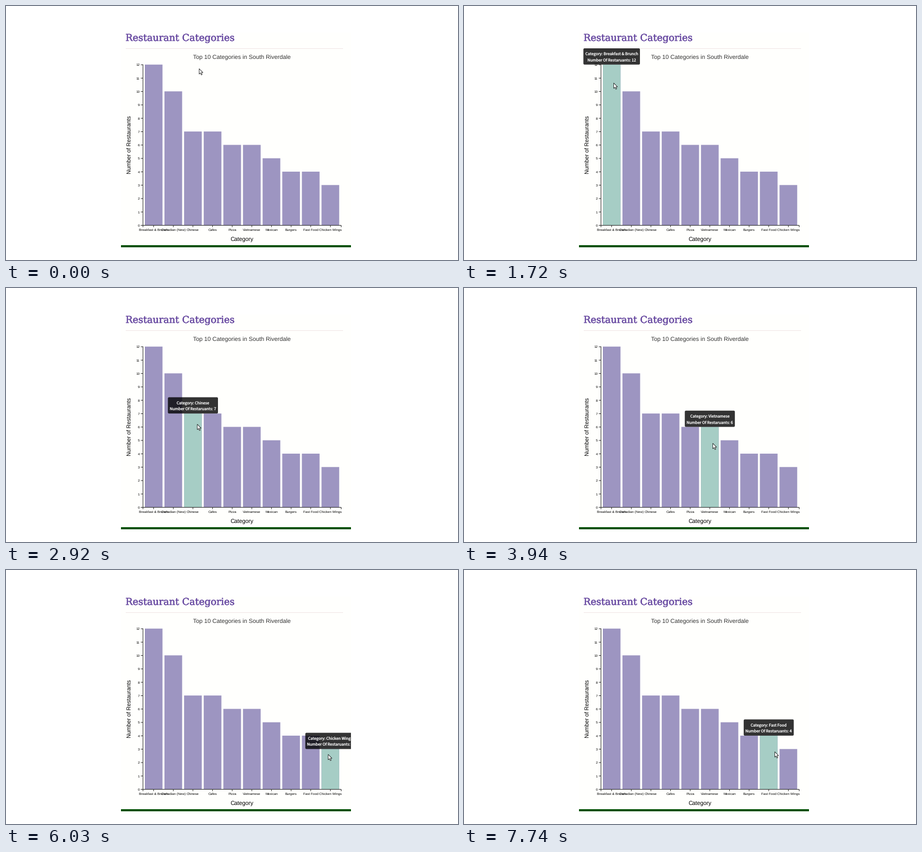
A matplotlib script that plays this animation: 853x480 px, repeating every 7870 ms.

```python
import numpy as np
import matplotlib.pyplot as plt
from matplotlib.animation import FuncAnimation
from matplotlib.patches import FancyBboxPatch, Polygon, Rectangle
from matplotlib.patheffects import withStroke

W, H, DPI = 853, 480, 64
LOOP, TICK = 7870, 10
PX = 72 / DPI  # points per pixel

PURPLE, BAR, HOVER = "#6a4ca3", "#9d95c1", "#a6cdc5"
SANS, SERIF, TIP = "Liberation Sans", "DejaVu Serif", "Noto Sans CJK JP"

DATA = [("Breakfast & Brunch", 12), ("Canadian (New)", 10), ("Chinese", 7),
        ("Cafes", 7), ("Pizza", 6), ("Vietnamese", 6), ("Mexican", 5),
        ("Burgers", 4), ("Fast Food", 4), ("Chicken Wings", 3)]
X0, PITCH, BAR_W = 262, 37.05, 33.35
BASE, UNIT = 414.2, 25.29

HOLDS = [130 if c == "L" else 60 for c in
         "L" "LsLLsLLs" "sLsLsLsLs" "LsLsLsLsL" "sLsLsLsLL" "sLsLsLsLs"
         "LsLsLsLsL" "sLsLsLsLs" "LsLLsLLs" "LsLsLsLss" "L"]
STARTS = np.concatenate([[0], np.cumsum(HOLDS)[:-1]])

# Pointer path: time, x, y
PATH = np.array([(0, 364, 118), (1720, 282, 145), (2920, 360.5, 257),
                 (3940, 469, 293), (5080, 552.5, 327), (6030, 607.5, 348),
                 (7740, 586, 343)])
ARROW = np.array([(0, 0), (0, 10.2), (2.4, 8), (4, 11.8), (5.7, 11),
                  (4.1, 7.4), (7.2, 7.4)])

plt.rcParams["text.hinting"] = "none"
fig = plt.figure(figsize=(W / DPI, H / DPI), dpi=DPI, facecolor="white")


def stage():
    ax = fig.add_axes([0, 0, 1, 1])
    ax.set(xlim=(0, W), ylim=(H, 0))
    ax.axis("off")
    return ax


def label(ax, x, y, s, px, font=SANS, color="black", ha="center", **kw):
    return ax.text(x, y, s, fontsize=px * PX, family=font, color=color,
                   ha=ha, va="baseline", **kw)


def line(ax, xs, ys, color="#222222", px=1):
    # Snapping would push half-pixel centres onto the next pixel
    ax.plot(xs, ys, color=color, lw=px * PX, solid_capstyle="butt",
            solid_joinstyle="miter", snap=False)


def box(ax, x, y, w, h, color, **kw):
    return ax.add_patch(Rectangle((x, y), w, h, fc=color, ec="none",
                                  snap=False, **kw))


def bar_rect(i):
    h = DATA[i][1] * UNIT
    return X0 + i * PITCH, BASE - h, BAR_W, h


def bar_mid(i):
    return X0 + i * PITCH + BAR_W / 2


def draw_page(ax):
    box(ax, 217, 50, 434, 402, "#fffffd")
    box(ax, 217, 452, 434, 4, "#005000")
    label(ax, 225.5, 66, "Restaurant Categories", 18, SERIF, PURPLE, ha="left",
          path_effects=[withStroke(linewidth=0.5 * PX, foreground=PURPLE)])
    line(ax, (226, 636), (80.5, 80.5), "#efe4e4")
    label(ax, 445.3, 101, "Top 10 Categories in South Riverdale", 11.1,
          color="#333333")
    label(ax, 445.3, 443.5, "Category", 10.8)
    label(ax, 237, 262, "Number of Restaurants", 10.6, rotation=90,
          rotation_mode="anchor")

    for i, (name, _) in enumerate(DATA):
        box(ax, *bar_rect(i), BAR)
        mid = bar_mid(i)
        line(ax, (mid, mid), (414, 418))
        label(ax, mid, 424.5, name, 6.44)
    line(ax, (258.5, 258.5, 632.5, 632.5), (418, 414.5, 414.5, 418))

    line(ax, (258.5, 258.5), (110.5, 415))
    for n in range(13):
        y = 414.5 - n * UNIT
        line(ax, (254.5, 258.5), (y, y))
        label(ax, 252.5, y + 2.3, str(n), 6.44, ha="right")


# The page never changes, so it is rendered once and reused as a backdrop
page = stage()
draw_page(page)
fig.canvas.draw()
backdrop = np.array(fig.canvas.buffer_rgba())
page.remove()
fig.figimage(backdrop, origin="upper", zorder=-1)

ax = stage()
hover = box(ax, 0, 0, BAR_W, 1, HOVER, zorder=2)
tip = ax.add_patch(FancyBboxPatch((0, 0), 1, 1, fc=(0, 0, 0, 0.8), ec="none",
                                  boxstyle="round,pad=0,rounding_size=2.2",
                                  zorder=3))
lines = [label(ax, 0, 0, "", 7.3, TIP, "white", zorder=4) for _ in range(2)]
box(ax, 651, 0, W - 651, H, "white", zorder=5)
pointer = ax.add_patch(Polygon(ARROW, fc="white", ec="black", lw=0.75 * PX,
                               joinstyle="miter", zorder=6))
popup = [hover, tip, *lines]


def bar_at(x, y):
    for i in range(len(DATA)):
        left, top, w, _ = bar_rect(i)
        if left <= x <= left + w and top <= y <= BASE:
            return i
    return None


def show_popup(i):
    name, count = DATA[i]
    left, top, w, h = bar_rect(i)
    hover.set_bounds(left, top, w, h - 0.2)
    mid = bar_mid(i)
    texts = f"Category: {name}", f"Number Of Restaruants: {count}"
    for t, s, rise in zip(lines, texts, (18, 6)):
        t.set_text(s)
        t.set_position((mid, top - rise))
    width = max(t.get_window_extent().width for t in lines) + 7
    tip.set_bounds(mid - width / 2, top - 30.7, width, 30.7)


def update(n):
    now = STARTS[np.searchsorted(STARTS, n * TICK, side="right") - 1]
    x, y = (np.interp(now, PATH[:, 0], PATH[:, k]) for k in (1, 2))
    pointer.set_xy(ARROW + (x + 0.5, y + 0.5))
    i = bar_at(x, y)
    for artist in popup:
        artist.set_visible(i is not None)
    if i is not None:
        show_popup(i)
    return [*popup, pointer]


anim = FuncAnimation(fig, update, frames=LOOP // TICK, interval=TICK,
                     repeat=True, repeat_delay=0, cache_frame_data=False)
plt.show()
```
